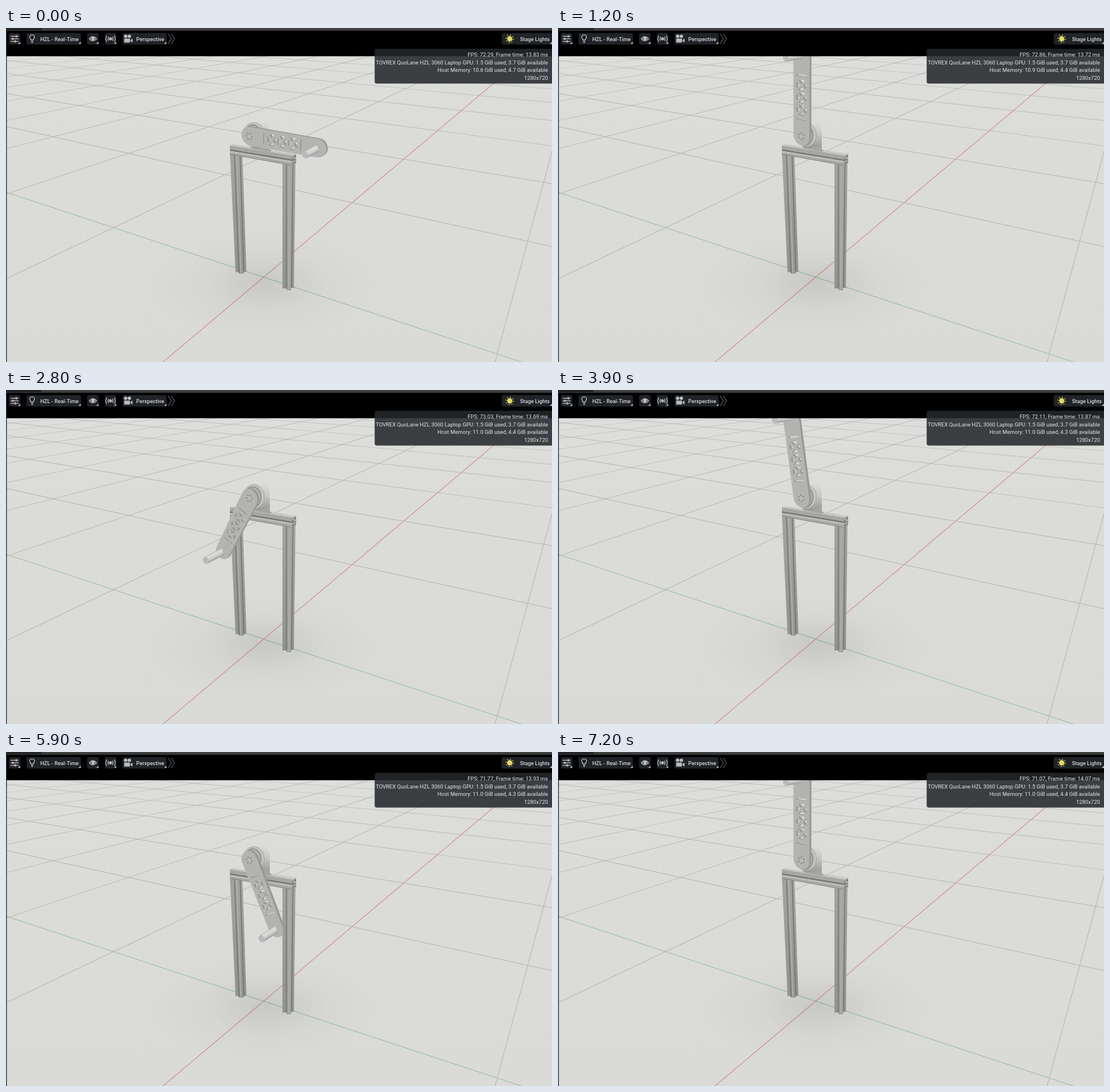
Animation of 956x586 px, one loop 7400 ms. Source, as an HTML page:

```html
<!DOCTYPE html>
<html lang="en">
<head>
<meta charset="utf-8">
<title>Swinging arm viewport</title>
<style>
  html, body { margin: 0; width: 100%; height: 100%; overflow: hidden; background: #dbdbd9; }
  svg { display: block; width: 956px; height: 586px; }
  text { font-family: Roboto, "Open Sans", sans-serif; fill: #d8d8d8; }
  .bar { font-size: 9.3px; font-weight: 500; }
  .stats text { font-size: 9.45px; fill: #e4e4e4; text-anchor: end; }
  .btn { fill: #202327; }
  .icon { fill: none; stroke: #b9bbbd; stroke-width: 1.4; }
  .solid { fill: #b9bbbd; }
</style>
</head>
<body>
<svg viewBox="0 0 956 586">
  <defs>
    <radialGradient id="shade">
      <stop offset="0" stop-color="#000" stop-opacity=".045"/>
      <stop offset=".5" stop-color="#000" stop-opacity=".022"/>
      <stop offset="1" stop-color="#000" stop-opacity="0"/>
    </radialGradient>
    <linearGradient id="ground" x2="0" y2="1">
      <stop offset="0" stop-color="#dededc"/>
      <stop offset=".4" stop-color="#dbdbd9"/>
      <stop offset="1" stop-color="#dadad8"/>
    </linearGradient>
    <linearGradient id="leg" x2="0" y2="1">
      <stop offset="0" stop-color="#a3a3a1"/>
      <stop offset="1" stop-color="#929290"/>
    </linearGradient>
    <linearGradient id="drum" x2="0" y2="1">
      <stop offset="0" stop-color="#dededc"/>
      <stop offset=".5" stop-color="#c6c6c4"/>
      <stop offset="1" stop-color="#989896"/>
    </linearGradient>
  </defs>

  <rect width="956" height="586" fill="url(#ground)"/>
  <g id="grid" fill="none" stroke-width="1.2"></g>
  <ellipse cx="450" cy="452" rx="200" ry="95" fill="url(#shade)"/>
  <ellipse cx="455" cy="445" rx="110" ry="55" fill="url(#shade)"/>

  <!-- stand -->
  <path d="M392 218L414 222 421 428 417 428 416 431 408 431 407 428 402 429Z" fill="url(#leg)"/>
  <path d="M400 222L408 429M410 222L416.500 428" stroke="#727270" stroke-width="1.6"/>
  <path d="M404 223L411.500 430" stroke="#adadab" stroke-width="2"/>
  <path d="M484 236L507 234 504 456 499 456 499 460 492 460 491 457 484 457Z" fill="url(#leg)"/>
  <path d="M491 240V457M502.500 238L500 456" stroke="#747472" stroke-width="1.5"/>
  <path d="M496.500 240L495.500 459" stroke="#a9a9a7" stroke-width="5"/>
  <path d="M392 206L398 204 508 221 508 236 500 241 392 221Z" fill="#a6a6a4"/>
  <path d="M392 206L398 204 508 221 502 224Z" fill="#c9c9c7"/>
  <path d="M392 214L502 232" stroke="#71716f" stroke-width="1.8"/>
  <path d="M392 217L502 235.500" stroke="#c2c2c0" stroke-width="2"/>
  <path d="M392 221.500L500 241" stroke="#858583" stroke-width="1"/>
  <path d="M501 226L508 222V227L503.500 230 508 230V236L501 240Z" fill="#858583"/>
  <path d="M502 226L507 229M502 235L507 233" stroke="#d2d2d0" stroke-width="1.2"/>

  <!-- motor -->
  <path d="M428 203L462 186V213L466 215 462 217 429 211Z" fill="#a4a4a2"/>
  <path d="M416 186C415 170 428 161 441 161.500 454 162 462 171 462 186V200C458 209 446 212 432 210Z" fill="url(#drum)"/>
  <ellipse cx="434" cy="187" rx="18.500" ry="21" fill="#c3c3c1" stroke="#a5a5a3"/>
  <ellipse cx="432" cy="188" rx="14.500" ry="18" fill="#b3b3b1" stroke="#858583" stroke-width="1.5"/>

  <g id="arm"></g>

  <!-- toolbar -->
  <rect width="956" height="49.500"/>
  <path d="M0 0H956V5H0Z" fill="#37383a"/>
  <path d="M0 0H62V4H0Z" fill="#232426"/>
  <path d="M62 1H956" stroke="#4d4e4c"/>
  <path d="M.7 5V586" stroke="#2e2f30" stroke-width="1.4"/>
  <g id="buttons"></g>
  <g class="icon">
    <path d="M8 14.500H22M8 19H22M8 23.500H22"/>
    <path d="M18 12.500V16.500M12 17V21M16 21.500V25.500" stroke-width="2.4"/>
    <path d="M43.500 21C43.500 19 41.500 18 41.500 15.500A4.300 4.300 0 0 1 50 15.500C50 18 48 19 48 21ZM44 23.500H47.500M44.500 25.500H47"/>
    <path d="M146 19Q152 11.500 158.500 19 152 26 146 19Z"/>
    <circle class="solid" cx="152.300" cy="18.500" r="2.500"/>
    <circle class="solid" cx="183" cy="19" r="2"/>
    <path d="M179.500 15.500Q177.500 19 179.500 22.500M186.500 15.500Q188.500 19 186.500 22.500M176.500 13.500Q173 19 176.500 24.500M189.500 13.500Q193 19 189.500 24.500"/>
    <path d="M284 10L289.500 19 284 28M289.500 10L295 19 289.500 28" stroke="#55585b"/>
  </g>
  <g class="solid">
    <circle cx="209.500" cy="14.500" r="3"/>
    <circle cx="216" cy="14.500" r="3"/>
    <path d="M207 18.500H217V25.500H207ZM218 21L221.500 18.500V25.500L218 23Z"/>
  </g>
  <circle cx="882" cy="19" r="4.700" fill="#e3d765"/>
  <circle cx="882" cy="19" r="6.600" fill="none" stroke="#c9bd55" stroke-width="1.5" stroke-dasharray="2.200 2.980"/>
  <g class="bar">
    <text x="60" y="22.500">HZL - Real-Time</text>
    <text x="228" y="22.500">Perspective</text>
    <text x="900" y="22.500">Stage Lights</text>
  </g>

  <g class="stats">
    <rect x="645.500" y="36.500" width="314" height="61" rx="4" fill="#25292b" fill-opacity=".87"/>
    <text id="fps" x="949" y="50"></text>
    <text x="949" y="64">TOVREX QuoLane HZL 3060 Laptop GPU: 1.5 GiB used, 3.7 GiB available</text>
    <text id="mem" x="949" y="77"></text>
    <text x="949" y="91">1280x720</text>
  </g>
</svg>

<script>
const $ = id => document.getElementById(id);

function add(parent, tag, attrs) {
  const el = document.createElementNS('http://www.w3.org/2000/svg', tag);
  for (const k in attrs) el.setAttribute(k, attrs[k]);
  return parent.appendChild(el);
}

// Ground grid: each family meets in a vanishing point, with evenly spaced inverse slopes.
function gridLine(vx, vy, run, stroke, opacity) {
  add($('grid'), 'path', { d: `M${vx} ${vy}L${vx + run * 700} ${vy + 700}`, stroke, 'stroke-opacity': opacity });
}
for (let k = 0; k < 13; k++) {
  const fade = Math.max(.4, 1 - k * .06);
  gridLine(1028, -50, -.27 - .914 * k, k === 1 ? '#cb8f8c' : '#b7b7b5', k === 1 ? 1 : fade);
  gridLine(-1055, -60, 3.03 + 1.503 * k, k === 0 ? '#9cc49b' : '#b7b7b5', k === 0 ? 1 : fade);
}

// Toolbar buttons with a corner mark
for (const [x, w, mark] of [[5, 20, 1], [36, 95, 1], [142, 20, 1], [173, 20, 1], [204, 77, 1], [868, 92, 0]]) {
  add($('buttons'), 'rect', { x, y: 9, width: w, height: 20, rx: 3, class: 'btn' });
  if (mark) add($('buttons'), 'path', { d: `M${x + w} 24V28H${x + w - 4}Z`, fill: '#b9bbbd' });
}
add($('buttons'), 'path', { d: 'M956 24V28H952Z', fill: '#b9bbbd' });

// Arm parts, in units of the arm's length
const outline = [], bolts = [], holes = [];
for (let i = 0; i <= 12; i++) {
  const a = Math.PI * (.5 + i / 12);
  outline.push([.123 * Math.cos(a), .123 * Math.sin(a)]);
}
for (let i = 0; i <= 12; i++) {
  const a = Math.PI * (-.5 + i / 12);
  outline.push([1 + .115 * Math.cos(a), .115 * Math.sin(a)]);
}
for (let i = 0; i < 6; i++) bolts.push([.043 * Math.cos(i * Math.PI / 3), .043 * Math.sin(i * Math.PI / 3)]);

const H = .08;
for (const u of [.212, .757]) holes.push([[u, -H], [u + .022, -H], [u + .022, H], [u, H]]);
for (let i = 0; i < 3; i++) {
  const m = .342 + i * .1535, c = .067, g = .022;
  for (const s of [-1, 1]) {
    holes.push([[m - c + g, s * H], [m + c - g, s * H], [m, s * .02]]);
    holes.push([[m + s * c, -H + g], [m + s * c, H - g], [m + s * .016, 0]]);
  }
}

const arm = $('arm');
const sides = [.14, .1, .06, .03].map(depth =>
  ({ depth, el: add(arm, 'path', { fill: '#989896', 'fill-rule': 'evenodd' }) }));
const face = add(arm, 'path', { fill: '#b3b3b1', 'fill-rule': 'evenodd', stroke: '#bebebc', 'stroke-width': .5 });
const dots = bolts.map(() => add(arm, 'circle', { r: 1.25, fill: '#868684' }));
const hub = add(arm, 'circle', { r: 1.6, fill: '#c6c6c4' });
const peg = [['#a9a9a7', 13, 0], ['#c9c9c7', 9.5, -1.5], ['#d9d9d7', 5, -2.8]].map(([stroke, width, dy]) =>
  ({ dy, el: add(arm, 'path', { stroke, 'stroke-width': width }) }));
const cap = add(arm, 'ellipse', { rx: 5, ry: 6.5, fill: '#bababa' });

// Perspective of the swing plane; depth moves a point toward the far vanishing point.
function project(angle, u, v, depth = 0) {
  const c = Math.cos(angle), s = Math.sin(angle);
  const a = u * c - v * s, b = u * s + v * c, w = 1 - .07 * a - .084 * b;
  const x = 426 + 111 * a / w, y = 190 + (23 * a - 130 * b) / w;
  return [x + (1028 - x) * depth * .045, y + (-50 - y) * depth * .045];
}

const fix = p => p.map(n => n.toFixed(2)).join(' ');
const shape = (pts, angle, depth) => 'M' + pts.map(([u, v]) => fix(project(angle, u, v, depth))).join('L') + 'Z';
const plate = (angle, depth) => [outline, ...holes].map(p => shape(p, angle, depth)).join('');

function drawArm(angle) {
  for (const s of sides) s.el.setAttribute('d', plate(angle, s.depth));
  face.setAttribute('d', plate(angle, 0));
  const put = (el, [x, y]) => { el.setAttribute('cx', x); el.setAttribute('cy', y); };
  dots.forEach((el, i) => put(el, project(angle, ...bolts[i])));
  put(hub, project(angle, 0, 0));
  const [x0, y0] = project(angle, 1, 0), [x1, y1] = project(angle, 1, 0, -1);
  for (const p of peg) p.el.setAttribute('d', `M${x0} ${y0 + p.dy}L${x1} ${y1 + p.dy}`);
  put(cap, [x1, y1]);
  cap.setAttribute('transform', `rotate(${Math.atan2(y1 - y0, x1 - x0) * 180 / Math.PI + 180} ${x1} ${y1})`);
}

// Swing: [time in 100 ms, degrees]
const swing = [
  [0, 1.5], [4, 58], [8, 85], [10, 90], [12, 90], [14, 83], [16, 64], [20, 4], [24, -62],
  [28, -118], [32, -173], [35, -219], [37, -246], [39, -261], [41, -265], [44, -259], [48, -236],
  [51, -200], [56, -117], [59, -64], [63, 0], [67, 56], [70, 82], [72, 90]
];

const slope = i => {
  const a = swing[Math.max(i - 1, 0)], b = swing[Math.min(i + 1, swing.length - 1)];
  return (b[1] - a[1]) / (b[0] - a[0]);
};

function angleAt(t) {
  let i = 0;
  while (i < swing.length - 2 && t >= swing[i + 1][0]) i++;
  const [t0, a] = swing[i], [t1, b] = swing[i + 1], d = t1 - t0, k = (t - t0) / d;
  const k2 = k * k, k3 = k2 * k;
  return a * (2 * k3 - 3 * k2 + 1) + b * (3 * k2 - 2 * k3)
    + d * (slope(i) * (k3 - 2 * k2 + k) + slope(i + 1) * (k3 - k2));
}

// Readouts: [time in 100 ms, value...]
const rates = [[0, 72.29], [2, 72.52], [12, 72.86], [22, 73.03], [32, 72.11], [42, 71.91], [52, 71.77], [62, 71.07]];
const memory = [[0, '10.6', '4.7'], [2, '10.8', '4.5'], [12, '10.9', '4.4'], [22, '11.0', '4.4'], [32, '11.0', '4.3'], [68, '11.0', '4.4']];
const current = (list, t) => list.filter(e => e[0] <= t).pop();

let last = -1;
function tick() {
  const t = Math.min(72, Math.floor(performance.now() % 7400 / 100));
  if (t !== last) {
    last = t;
    drawArm(angleAt(t) * Math.PI / 180);
    const fps = current(rates, t)[1], [, used, free] = current(memory, t);
    $('fps').textContent = `FPS: ${fps.toFixed(2)}, Frame time: ${(1000 / fps).toFixed(2)} ms`;
    $('mem').textContent = `Host Memory: ${used} GiB used, ${free} GiB available`;
  }
  requestAnimationFrame(tick);
}
tick();
</script>
</body>
</html>
```
